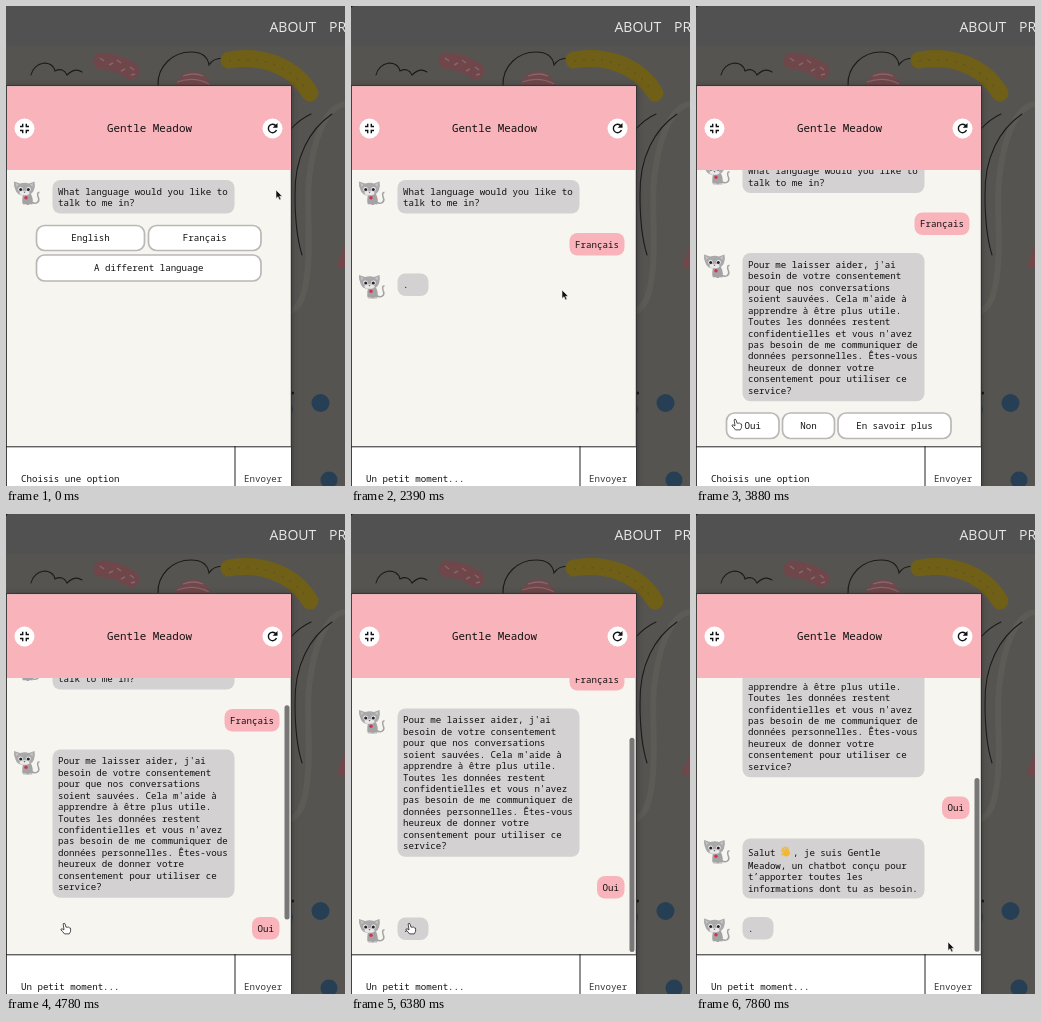
Animation of 339 by 480 pixels, one loop 8 s. Source, as an HTML page:

```html
<!DOCTYPE html>
<html lang="fr">
<head>
<meta charset="utf-8">
<title>Chat</title>
<style>
html, body { margin: 0; width: 100%; height: 100%; overflow: hidden; background: #535353; }
svg { display: block; width: 100%; height: 100%; }
text { font: 500 9.15px "Noto Sans Mono", "DejaVu Sans Mono", monospace; fill: #111; white-space: pre; }
.nav { font: 400 14px "Open Sans", "Noto Sans", sans-serif; font-stretch: 75%; fill: #e8e8e8; }
.title { font-size: 10.9px; }
.mid { text-anchor: middle; }
.line { fill: none; stroke: #1a1a1a; stroke-width: 1.1; stroke-linecap: round; }
.grey { fill: #d3d1d1; }
.pink { fill: #f9b4bb; }
.button { fill: #fff; stroke: #b9b8b7; stroke-width: 1.7; }
.icon { fill: none; stroke: #111; stroke-width: 1.4; }
</style>
</head>
<body>
<svg viewBox="0 0 339 480" preserveAspectRatio="none">
  <defs>
    <clipPath id="view"><rect x="1" y="164" width="284" height="276"/></clipPath>
    <filter id="soft" x="-10%" y="-10%" width="120%" height="120%"><feGaussianBlur stdDeviation="3"/></filter>
    <g id="cat">
      <path d="M17 22C22 25 26 22 24.500 18C23 14.500 23.500 12 25.500 12.500" fill="none" stroke="#a3a2a4" stroke-width="1.5"/>
      <path d="M9 14Q7 25 10 25H18Q20 20 17 14Z" fill="#a3a2a4"/>
      <path d="M0 1.500L6 3.500Q11 2 15 3.500L20.500 1.500Q21.500 6 20 10Q18 15.500 10.500 15.500Q3 15.500 1.500 10Q-.5 6 0 1.500Z" fill="#a9a8aa"/>
      <path d="M1.500 3L4.500 4.500L2.500 7ZM19 3L16 4.500L18.500 7Z" fill="#c9c3c6"/>
      <ellipse cx="10.500" cy="13" rx="5" ry="2.300" fill="#e9e7e7"/>
      <circle cx="6.500" cy="9.300" r="2.200" fill="#f2f2f2"/><circle cx="14.500" cy="9.300" r="2.200" fill="#f2f2f2"/>
      <circle cx="6.700" cy="9.600" r="1.500" fill="#222"/><circle cx="14.300" cy="9.600" r="1.500" fill="#222"/>
      <path d="M9.500 11.800H11.500L10.500 13Z" fill="#444"/>
      <circle cx="12" cy="17.800" r="1.700" fill="#d2344f"/>
      <path d="M9 24.500h3.500M15 24.500h3.500" stroke="#ddd" stroke-width="1.200"/>
    </g>
  </defs>

  <rect width="339" height="480" fill="#555451"/>
  <rect width="339" height="40" fill="#515151"/>
  <path d="M339 98C318 101 307 137 303 174C300 205 307 250 298 286Q294 301 285 305" fill="none" stroke="#5d5b55" stroke-width="6"/>
  <g class="line">
    <path d="M25 69C28 55 46 53 49 65Q57 61 61 69Q69 61 76 66"/>
    <path d="M152 80C151 60 167 46 185 46Q201 46 203 59Q210 48 229 55"/>
    <path d="M326 108C304 123 288 151 289 190Q289 226 296 249M305 108Q294 113 285 123"/>
  </g>
  <path d="M96 55Q112 56 125 65" fill="none" stroke="#6f474b" stroke-width="17" stroke-linecap="round"/>
  <path d="M94 52l4 3M103 59l4-2M111 54l4 3M115 65l4-2M124 61l4 3M125 69l4-1" stroke="#85666a" stroke-width="1.500"/>
  <circle cx="187" cy="83" r="17.500" fill="#70474b"/>
  <path d="M171 76Q188 70 203 78M177 70Q188 66 197 70" fill="none" stroke="#85666a" stroke-width="1.300"/>
  <path d="M223 54C251 49 286 57 304 87" fill="none" stroke="#705f17" stroke-width="17" stroke-linecap="round"/>
  <path d="M223 55C251 50 284 58 302 86" fill="none" stroke="#63551c" stroke-width="1.500" stroke-dasharray="2 7"/>
  <path d="M339 239L331 259Q333 263 339 262Z" fill="#70474b"/>
  <g fill="#263f54">
    <circle cx="314.500" cy="397" r="9"/><circle cx="323" cy="474" r="8.500"/><circle cx="277.500" cy="403" r="9.500"/>
  </g>
  <circle cx="286.500" cy="387" r="1.500" fill="#111"/>
  <text class="nav" x="263.500" y="26">ABOUT</text>
  <text class="nav" x="323" y="26">PROJECTS</text>

  <rect x="0" y="80" width="286" height="410" fill="#222" opacity=".45" filter="url(#soft)"/>
  <rect x=".3" y="79.800" width="285" height="402" fill="#f7f5ef" stroke="#222"/>
  <g clip-path="url(#view)"><g id="feed"></g><rect id="thumb" x="278.500" width="5" rx="2.500" fill="#777"/></g>
  <rect class="pink" x="1" y="80.300" width="284" height="83.700"/>
  <text class="title mid" x="143.500" y="126">Gentle Meadow</text>
  <circle cx="18.500" cy="122.500" r="10" fill="#fff"/>
  <path class="icon" d="M14 120.500h2.700v-2.700M23 120.500h-2.700v-2.700M14 124.500h2.700v2.700M23 124.500h-2.700v2.700"/>
  <circle cx="266.500" cy="122.500" r="10" fill="#fff"/>
  <path class="icon" d="M270 120A4.200 4.200 0 1 0 270.500 124"/>
  <path d="M271.500 117v4.800h-4.800Z" fill="#111"/>
  <rect x="1" y="440" width="284" height="40" fill="#fff"/>
  <path d="M0 440.800H285M229 440V480" stroke="#222"/>
  <text id="status" x="15" y="476.300"></text>
  <text x="238" y="476.300" fill-opacity=".85">Envoyer</text>
  <path id="corner" d="M0 0H3Q0 0 0 3Z" fill="#111"/>

  <path id="arrow" d="M0 0V9.800L2.300 7.800L4 11.500L5.800 10.700L4.200 7.200H7.200Z" fill="#111" stroke="#eee" stroke-width=".7"/>
  <path id="hand" d="M-1 1Q0-.8 1.200 1L2.400 5Q3.500 3.800 4.300 5Q5.500 4.200 6.200 5.500Q7.500 5 7.700 7Q8 10.500 6 12.500H.5Q-1 10-3.500 8Q-3.800 6.300-2 6.800L0 8Z" fill="#fff" stroke="#222" stroke-width=".9" stroke-linejoin="round"/>
</svg>
<script>
const LOOP = 8000, TOP = 164, VIEW = 276;
const $ = id => document.getElementById(id);
const feed = $("feed");
const items = [];

const text = (x, y, str, cls = "") => `<text class="${cls}" x="${x}" y="${y}">${str}</text>`;
const box = (cls, x, y, w, h) => `<rect class="${cls}" x="${x}" y="${y}" width="${w}" height="${h}" rx="8"/>`;
const cat = y => `<use href="#cat" x="8" y="${y}"/>`;
const button = (x, y, w, h, label) => box("button", x, y, w, h) + text(x + w / 2, y + h / 2 + 3, label, "mid");
const reply = (x, y, w, label) => box("pink", x, y, w, 22.5) + text(x + w / 2, y + 14.5, label, "mid");
const lines = (y, list) => list.map((s, i) => text(52, y + 14.7 + i * 11.47, s)).join("");
const message = (y, list) =>
  cat(y) + box("grey", 46.5, y, 182, list.length * 11.47 + 10.6) + lines(y, list);

// Adds a piece of the conversation that is shown from `from` to `to`.
function add(from, to, markup) {
  const el = document.createElementNS("http://www.w3.org/2000/svg", "g");
  el.innerHTML = markup;
  feed.append(el);
  items.push({ el, from, to });
  return el;
}

// A typing bubble gains a dot at each time in `ticks`, from one to three and round again.
const typing = [];
function addTyping(from, to, y, ticks) {
  const el = add(from, to, cat(y) + box("grey", 46.5, y, 31, 22.5) + text(52, y + 14.7, ""));
  typing.push({ label: el.querySelector("text"), ticks });
}

add(0, LOOP, message(174, ["What language would you like to", "talk to me in?"]));
add(0, 600, button(30.5, 219.5, 108, 25, "English") + button(142.5, 219.5, 112.5, 25, "Français") +
  button(30.5, 249, 224.5, 26, "A different language"));
add(600, LOOP, reply(218.5, 227, 55, "Français"));
addTyping(990, 2580, 267.5, [1240, 1520, 1960, 2390]);
add(2580, LOOP, message(267.5, [
  "Pour me laisser aider, j'ai", "besoin de votre consentement", "pour que nos conversations",
  "soient sauvées. Cela m'aide à", "apprendre à être plus utile.", "Toutes les données restent",
  "confidentielles et vous n'avez", "pas besoin de me communiquer de", "données personnelles. Êtes-vous",
  "heureux de donner votre", "consentement pour utiliser ce", "service?"]));
add(2730, 4290, button(30.5, 427.5, 52.5, 25.5, "Oui") + button(86.5, 427.5, 52, 25.5, "Non") +
  button(142, 427.5, 113, 25.5, "En savoir plus"));
add(4290, LOOP, reply(246, 435, 27.5, "Oui"));
addTyping(4600, 6530, 476.5, [5430, 5670, 5930, 6180, 6380]);
const wave = `<g transform="translate(90 490.500) rotate(-28)" stroke="#f2b632" stroke-width="1.500" stroke-linecap="round">
  <path d="M-2.300 0L-3-3.500M-.7-1L-1-5M1.200-1L1.300-4.800M2.600 0L3.300-3.300M-2.500 2L-4.800 0"/><rect x="-2.300" y="-.5" width="4.800" height="4" rx="1.500" fill="#f2b632"/></g>`;
add(6530, LOOP, cat(477) + box("grey", 46.5, 477, 182, 60) + text(52, 494.5, "Salut") + wave +
  text(97, 494.5, ", je suis Gentle") + text(52, 507, "Meadow, un chatbot conçu pour") +
  text(52, 518.5, "t’apporter toutes les") + text(52, 530, "informations dont tu as besoin."));
addTyping(6600, LOOP, 555.5, [6680, 7180, 7520, 7860]);

// Eased interpolation over rows of [time, ...values].
function track(rows, t) {
  const i = rows.findIndex(r => r[0] > t);
  if (i === 0) return rows[0].slice(1);
  if (i < 0) return rows[rows.length - 1].slice(1);
  const a = rows[i - 1], b = rows[i];
  const p = (t - a[0]) / (b[0] - a[0]);
  const e = p * p * (3 - 2 * p);
  return a.slice(1).map((v, k) => v + (b[k + 1] - v) * e);
}

const scrollRows = [[2580, 0], [2730, 20.5], [4290, 20.5], [4600, 32], [5430, 32], [5670, 73], [6530, 73], [6680, 152.5]];
const pointer = [
  [100, 270, 184], [480, 224, 235], [1520, 224, 235], [2390, 211, 284],
  [3440, 211, 284], [3660, 95, 408], [3880, 39, 413], [4290, 39, 413],
  [4600, 58, 409], [6380, 58, 409], [6680, 57, 408.5], [7180, 57, 408.5], [7860, 252, 428]
];
const between = (t, a, b) => t >= a && t < b;
const show = (el, on) => el.setAttribute("visibility", on ? "visible" : "hidden");

function draw(t) {
  items.forEach(({ el, from, to }) => show(el, between(t, from, to)));
  typing.forEach(({ label, ticks }) => {
    const n = ticks.filter(k => k <= t).length;
    label.textContent = n ? ".".repeat((n - 1) % 3 + 1) : "";
  });

  const [scroll] = track(scrollRows, t);
  feed.setAttribute("transform", `translate(0 ${-scroll})`);
  const content = t < 6530 ? 349 : 429;
  const thumb = $("thumb");
  thumb.setAttribute("y", TOP + 2 + scroll / content * VIEW);
  thumb.setAttribute("height", VIEW * VIEW / content - 4);
  show(thumb, t >= 4600);

  const waiting = between(t, 990, 2580) || t >= 4290;
  $("status").textContent = waiting ? "Un petit moment..." : "Choisis une option";
  show($("corner"), t >= 1520);

  const [x, y] = track(pointer, t);
  const overButton = between(t, 400, 600) || between(t, 3800, 7180);
  for (const id of ["arrow", "hand"]) {
    $(id).setAttribute("transform", `translate(${x} ${y}) scale(.87)`);
    show($(id), (id === "hand") === overButton);
  }
}

const start = performance.now();
function tick() {
  draw((performance.now() - start) % LOOP);
  requestAnimationFrame(tick);
}
tick();
</script>
</body>
</html>
```
